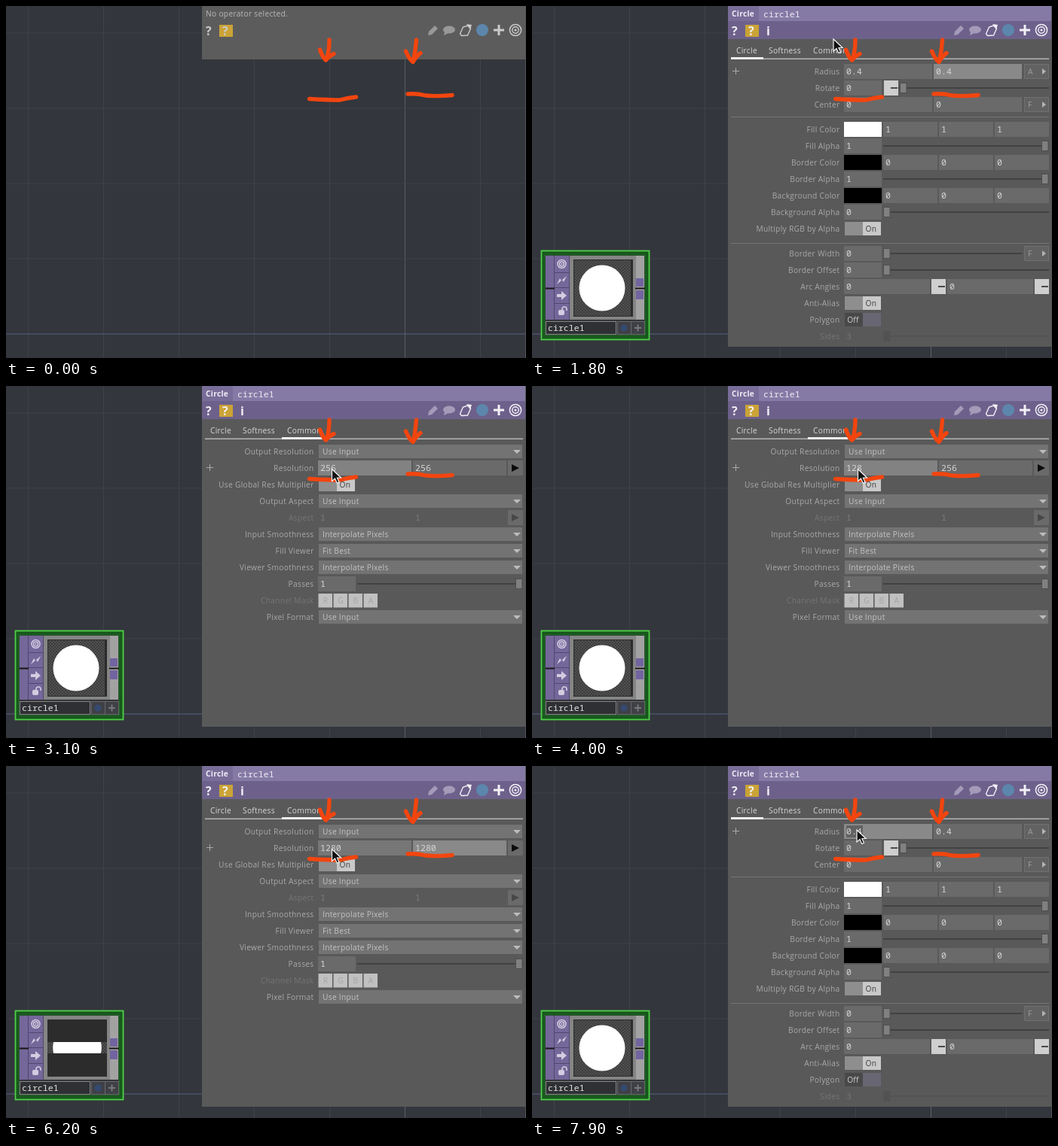
An HTML page for the animation above (8 s loop, 690 by 468 pixels).

```html
<!DOCTYPE html>
<html lang="en">
<head>
<meta charset="utf-8">
<title>Circle parameters</title>
<style>
html, body { margin: 0; width: 100%; height: 100%; overflow: hidden; background: #33363c; }
svg { display: block; width: 690px; height: 468px; }
text { font: 10.2px "Open Sans", "Noto Sans", sans-serif; letter-spacing: .3px; white-space: pre; }
.mono { font: 11.6px "Noto Sans Mono", "DejaVu Sans Mono", monospace; letter-spacing: 0; }
.bold { font-weight: 700; }
.big { font-size: 16px; font-weight: 700; }
</style>
</head>
<body>
<svg id="stage" viewBox="0 0 690 468" xmlns="http://www.w3.org/2000/svg"></svg>
<script>
const NS = "http://www.w3.org/2000/svg";
const LOOP = 8000;
const FIELD = "#6a6a6a", FOCUS = "#898989", HOVER = "#777777";
const LABEL = "#a9a9a9", VALUE = "#d6d6d6";
const stage = document.getElementById("stage");

function add(parent, tag, attrs, content) {
  const el = document.createElementNS(NS, tag);
  for (const key in attrs) el.setAttribute(key, attrs[key]);
  if (content !== undefined) el.textContent = content;
  parent.appendChild(el);
  return el;
}
const group = (parent, attrs = {}) => add(parent, "g", attrs);
const box = (g, x1, y1, x2, y2, fill, more = {}) =>
  add(g, "rect", { x: x1, y: y1, width: x2 - x1, height: y2 - y1, fill, ...more });
const path = (g, d, fill, more = {}) => add(g, "path", { d, fill, ...more });
const line = (g, d, stroke, width = 1) => path(g, d, "none", { stroke, "stroke-width": width });
const label = (g, x, y, s, fill, more = {}) => add(g, "text", { x, y, fill, ...more }, s);
const show = (el, on) => el.setAttribute("visibility", on ? "inherit" : "hidden");

// ---- parameter widgets, each centred on row y ----
function name(g, y, s, dim) {
  label(g, 408.5, y + 4, s, dim ? "#757575" : LABEL, { "text-anchor": "end" });
}
function field(g, x1, x2, y, s, fill = FIELD) {
  const back = box(g, x1, y - 10, x2, y + 10, fill);
  const pick = box(g, x1 + 3, y - 8, x1 + 4, y + 8, "#626262", { visibility: "hidden" });
  const value = label(g, x1 + 3, y + 4, s, VALUE, { class: "mono" });
  return { back, pick, value };
}
function setField(f, s, fill, picked) {
  if (f.value.textContent !== s) f.value.textContent = s;
  f.back.setAttribute("fill", fill);
  f.pick.setAttribute("width", s.length * 7 + 1);
  show(f.pick, picked);
}
function knob(g, x, y, dim) {
  box(g, x + .5, y - 6.5, x + 9, y + 6.5, dim ? "#525252" : "#808080",
    { stroke: dim ? "#555" : "#4f4f4f" });
}
function slider(g, x1, y, at, dim) {
  box(g, x1, y - 1, 686, y + 1, dim ? "#535353" : "#414141");
  knob(g, at, y, dim);
}
function valueSlider(g, y, title, s, at) {
  name(g, y, title);
  field(g, 414, 464, y, s);
  slider(g, 466, y, at);
}
function minus(g, x, y) {
  box(g, x, y - 10, x + 19, y + 10, "#cfcfcf");
  box(g, x + 9, y - 1, x + 18, y + 1, "#4a4a4a");
}
function menu(g, y, s) {
  box(g, 653.5, y - 9.5, 685.5, y + 9.5, "#626262", { stroke: "#707070" });
  label(g, 658, y + 4, s, "#9c9c9c");
  path(g, `M677 ${y - 4}l5 4l-5 4z`, "#b5b5b5");
}
function toggle(g, y, title, on) {
  name(g, y, title);
  box(g, 415, y - 9, 439, y + 9, on ? "#8e8e8e" : "#494949");
  box(g, 439, y - 9, 463, y + 9, on ? "#c9c9c9" : "#686673");
  label(g, on ? 450 : 426, y + 4, on ? "On" : "Off", on ? "#3c3c3c" : "#d2d2d2",
    { "text-anchor": "middle" });
}
function color(g, y, title, fill, s) {
  name(g, y, title);
  box(g, 414, y - 10, 464, y + 10, fill);
  for (let i = 0; i < 3; i++) field(g, 466 + 74 * i, 538 + 74 * i, y, s);
}
function dropdown(g, y, title, s) {
  name(g, y, title);
  box(g, 415, y - 9, 685, y + 9, "#737373");
  label(g, 420, y + 4, s, "#c4c4c4");
  path(g, `M673 ${y - 2}h10l-5 5z`, "#bdbdbd");
}
const plus = (g, y) => line(g, `M266 ${y - .5}h9M270.5 ${y - 5}v9`, "#aaa");

// ---- network background ----
box(stage, 0, 0, 690, 468, "#33363c");
for (let i = 0; i < 7; i++) line(stage, `M${29.5 + 100 * i} 0V468`, i === 5 ? "#5a5e66" : "#3f4349");
for (let i = 0; i < 5; i++) line(stage, `M0 ${36 + 100 * i}H690`, i === 4 ? "#566086" : "#3f4349");

// ---- node ----
const defs = add(stage, "defs", {});
const check = add(defs, "pattern", { id: "check", width: 4, height: 4, patternUnits: "userSpaceOnUse" });
box(check, 0, 0, 4, 4, "#3e3e3e");
box(check, 0, 0, 2, 2, "#505050");
box(check, 2, 2, 4, 4, "#505050");
box(add(defs, "clipPath", { id: "band" }), 55, 367, 134, 382, "#000");

const node = group(stage);
box(node, 12.5, 325.5, 155.5, 443.5, "#17581c", { stroke: "#50cf4a", "stroke-width": 1.8 });
box(node, 17, 331, 150, 438, "#333436", { stroke: "#236b28" });
box(node, 18, 332, 50, 417, "#74679a");
box(node, 50, 332, 138, 417, "#858585");
box(node, 138, 332, 149, 417, "#a3a2a3");
line(node, "M29.5 332V417M49.5 332V417M30 354.5H49M30 374.5H49M30 395.5H49", "#51476f");
line(node, "M18 375.5H30M137 375.5H150", "#161616", 2);
box(node, 138, 362, 148, 373, "#7264a0");
box(node, 138, 378, 148, 390, "#7264a0");

const light = "#d2cce0";
function target(g, x, y, r, stroke) {
  add(g, "circle", { cx: x, cy: y, r, fill: "none", stroke, "stroke-width": 1.5 });
  add(g, "circle", { cx: x, cy: y, r: r * .55, fill: "none", stroke, "stroke-width": 1.4 });
  add(g, "circle", { cx: x, cy: y, r: r * .2, fill: stroke });
}
target(node, 39.5, 343, 5.5, light);
path(node, "M33 370l4-8l2 3l7-6l-4 8l-2-3z", light);
path(node, "M33 383h6v-4l7 6l-7 6v-4h-6z", light);
box(node, 35, 404, 43, 411, light, { rx: 2 });
line(node, "M40 405v-2a3 3 0 0 1 6 0v2", light, 1.6);

box(node, 55, 337, 134, 413, "#2c2c2c");
const square = group(node);
box(square, 56, 338, 131, 412, "url(#check)");
add(square, "circle", { cx: 93, cy: 375, r: 30.5, fill: "#fff" });
const wide = group(node, { "clip-path": "url(#band)" });
box(wide, 55, 367, 134, 382, "url(#check)");
add(wide, "circle", { cx: 94.5, cy: 374.5, r: 32.3, fill: "#fff" });

box(node, 18.5, 419.5, 111.5, 436.5, "#2f3033", { stroke: "#85868a" });
box(node, 113.5, 419.5, 131.5, 436.5, "#3f4046", { stroke: "#66676c" });
box(node, 131.5, 419.5, 149.5, 436.5, "#3f4046", { stroke: "#66676c" });
add(node, "circle", { cx: 122, cy: 428, r: 4.5, fill: "#354a70" });
line(node, "M136 428H145M140.5 423.5V432.5", "#77787c", 2);
label(node, 21, 432, "circle1", "#e2e2e2", { class: "mono" });

// ---- panel ----
function icons(g, main, faint) {
  label(g, 265, 38.5, "?", main, { class: "big" });
  box(g, 283, 25, 301, 41, "#cba336");
  label(g, 287, 38.5, "?", main, { class: "big" });
  path(g, "M560 39l1-5l8-8l4 4l-8 8z", faint);
  add(g, "ellipse", { cx: 588, cy: 31.5, rx: 8, ry: 5, fill: faint });
  path(g, "M582 34l-1 5l6-3z", faint);
  path(g, "M602.5 37l4-9l6-2l4 4l-4 9l-8 .5z", "none", { stroke: main, "stroke-width": 1.4 });
  path(g, "M611 24l7 1l-2 6z", main);
  add(g, "circle", { cx: 632, cy: 32, r: 8, fill: "#5c86ac" });
  line(g, "M647 32H661M654 25V39", main, 3);
  target(g, 676, 32, 7.6, main);
}

const empty = group(stage);
box(empty, 260, 0, 690, 71, "#5c5c5c");
label(empty, 265, 14, "No operator selected.", "#b9b9b9");
icons(empty, "#cacaca", "#989898");

const panel = group(stage);
box(panel, 260, 0, 690, 453, "#595959");
box(panel, 260, 0, 690, 21, "#857aa6");
box(panel, 260, 0, 301, 20, "#786c99");
box(panel, 260, 20, 690, 44, "#6d618c");
label(panel, 265, 14, "Circle", "#f0eef4", { class: "bold" });
label(panel, 307, 15, "circle1", "#eeecf2", { class: "mono" });
icons(panel, "#f2f0f5", "#a49bb9");
label(panel, 311, 38.5, "i", "#f2f0f5", { class: "big" });
[["Circle", 271], ["Softness", 314], ["Common", 373]].forEach(([s, x]) => label(panel, x, 63, s, "#d8d8d8"));
box(panel, 264, 69.5, 686, 71, "#b5b5b5");
const tabMark = box(panel, 264, 68, 307, 71, "#f0f0f0");

// Circle page
const circlePage = group(panel);
plus(circlePage, 87);
name(circlePage, 87, "Radius");
const radius = [field(circlePage, 414, 531, 87, "0.4"), field(circlePage, 533, 650, 87, "0.4")];
menu(circlePage, 87, "A");
name(circlePage, 109, "Rotate");
field(circlePage, 414, 464, 109, "0");
slider(circlePage, 486, 109, 488);
minus(circlePage, 467, 109);
name(circlePage, 131, "Center");
field(circlePage, 414, 531, 131, "0");
field(circlePage, 533, 650, 131, "0");
menu(circlePage, 131, "F");
line(circlePage, "M264 147.5H686M264 315.5H686", "#747474");
color(circlePage, 164, "Fill Color", "#fff", "1");
valueSlider(circlePage, 186, "Fill Alpha", "1", 676);
color(circlePage, 208, "Border Color", "#000", "0");
valueSlider(circlePage, 230, "Border Alpha", "1", 676);
color(circlePage, 252, "Background Color", "#000", "0");
valueSlider(circlePage, 274, "Background Alpha", "0", 466);
toggle(circlePage, 296, "Multiply RGB by Alpha", true);
name(circlePage, 329, "Border Width");
field(circlePage, 414, 464, 329, "0");
box(circlePage, 466, 328, 650, 330, "#414141");
knob(circlePage, 466, 329);
menu(circlePage, 329, "F");
valueSlider(circlePage, 351, "Border Offset", "0", 466);
name(circlePage, 373, "Arc Angles");
field(circlePage, 414, 528, 373, "0");
minus(circlePage, 530, 373);
field(circlePage, 551, 665, 373, "0");
minus(circlePage, 667, 373);
toggle(circlePage, 395, "Anti-Alias", true);
toggle(circlePage, 417, "Polygon", false);
name(circlePage, 439, "Sides", true);
label(circlePage, 417, 443, "3", "#757575", { class: "mono" });
slider(circlePage, 466, 439, 466, true);

// Common page
const commonPage = group(panel);
plus(commonPage, 109);
dropdown(commonPage, 87, "Output Resolution", "Use Input");
name(commonPage, 109, "Resolution");
const res = [field(commonPage, 414, 538, 109, "256"), field(commonPage, 540, 664, 109, "256")];
box(commonPage, 666, 99, 686, 119, "#6a6a6a");
path(commonPage, "M671 104l10 5l-10 5z", "#0c0c0c");
toggle(commonPage, 131, "Use Global Res Multiplier", true);
dropdown(commonPage, 153, "Output Aspect", "Use Input");
name(commonPage, 175, "Aspect", true);
label(commonPage, 417, 179, "1", "#7b7b7b", { class: "mono" });
label(commonPage, 543, 179, "1", "#7b7b7b", { class: "mono" });
box(commonPage, 666, 165, 686, 185, "#6a6a6a");
path(commonPage, "M671 170l10 5l-10 5z", "#484848");
dropdown(commonPage, 197, "Input Smoothness", "Interpolate Pixels");
dropdown(commonPage, 219, "Fill Viewer", "Fit Best");
dropdown(commonPage, 241, "Viewer Smoothness", "Interpolate Pixels");
valueSlider(commonPage, 263, "Passes", "1", 676);
name(commonPage, 285, "Channel Mask", true);
[..."RGBA"].forEach((s, i) => {
  const x = 414 + 20 * i;
  box(commonPage, x + .5, 276, x + 19, 294.5, "#c0c0c0");
  label(commonPage, x + 10, 289, s, "#a4a4a4", { "text-anchor": "middle" });
});
dropdown(commonPage, 307, "Pixel Format", "Use Input");

// ---- window edge, red marks and pointer ----
box(stage, 689, 0, 690, 468, "#505356");
path(stage, "M429 45Q429 59 425.5 71M416.5 58Q420 68 424.5 72Q428 67 435 63.5"
  + "M544.5 45Q543.5 60 540.5 73M530.5 60Q535 71 540 74.5Q544 67 550 62.5"
  + "M402.5 123.5Q430 125 443 125Q454 122 464.5 121M533 117Q545 116 557 119Q575 120.5 592 118.5",
  "none", { stroke: "#f2450f", "stroke-width": 5.4, "stroke-linecap": "round", "stroke-linejoin": "round" });
const pointer = path(stage, "M0 0V16L4 12.5L6.7 18.5L9.5 17.3L6.9 11.5H12Z", "#111",
  { stroke: "#f4f4f4", "stroke-width": 1.2 });

// time, x, y
const route = [
  [1400, 440, -20], [1800, 400, 44], [2100, 395, 58], [2400, 395, 58],
  [2850, 432.5, 110.5], [6650, 432.5, 110.5], [7050, 290, 58], [7200, 290, 58], [7600, 431, 85]
];
function along(t) {
  if (t <= route[0][0]) return route[0].slice(1);
  for (let i = 1; i < route.length; i++) {
    const [t0, x0, y0] = route[i - 1], [t1, x1, y1] = route[i];
    if (t < t1) {
      const u = (t - t0) / (t1 - t0), e = u * u * (3 - 2 * u);
      return [x0 + (x1 - x0) * e, y0 + (y1 - y0) * e];
    }
  }
  return route[route.length - 1].slice(1);
}
function typed(t, start) {
  return t < start ? "256" : "1280".slice(0, 1 + Math.floor((t - start) / 200));
}

function draw(t) {
  const open = t >= 400;
  const common = t >= 2300 && t < 7150;
  const stretched = t >= 4500 && t < 6500;
  show(empty, !open);
  show(node, open);
  show(panel, open);
  show(circlePage, !common);
  show(commonPage, common);
  show(square, !stretched);
  show(wide, stretched);
  tabMark.setAttribute("x", common ? 366 : 264);
  tabMark.setAttribute("width", common ? 53 : 43);

  const editing = t >= 7700;
  setField(radius[0], "0.4", editing ? FOCUS : FIELD, editing);
  setField(radius[1], "0.4", t < 2300 ? FOCUS : FIELD, false);

  const second = t >= 4500;
  const over = t >= 2700 && t < 6750;
  setField(res[0], typed(t, 3600), second ? (over ? HOVER : FIELD) : over ? "#828282" : FIELD,
    t >= 3300 && t < 3600);
  setField(res[1], typed(t, 5300), second ? FOCUS : FIELD, second && t < 5300);

  const [x, y] = along(t);
  pointer.setAttribute("transform", `translate(${x.toFixed(2)} ${y.toFixed(2)})`);
}

const start = performance.now();
function tick() {
  draw((performance.now() - start) % LOOP);
  requestAnimationFrame(tick);
}
draw(0);
requestAnimationFrame(tick);
</script>
</body>
</html>
```
